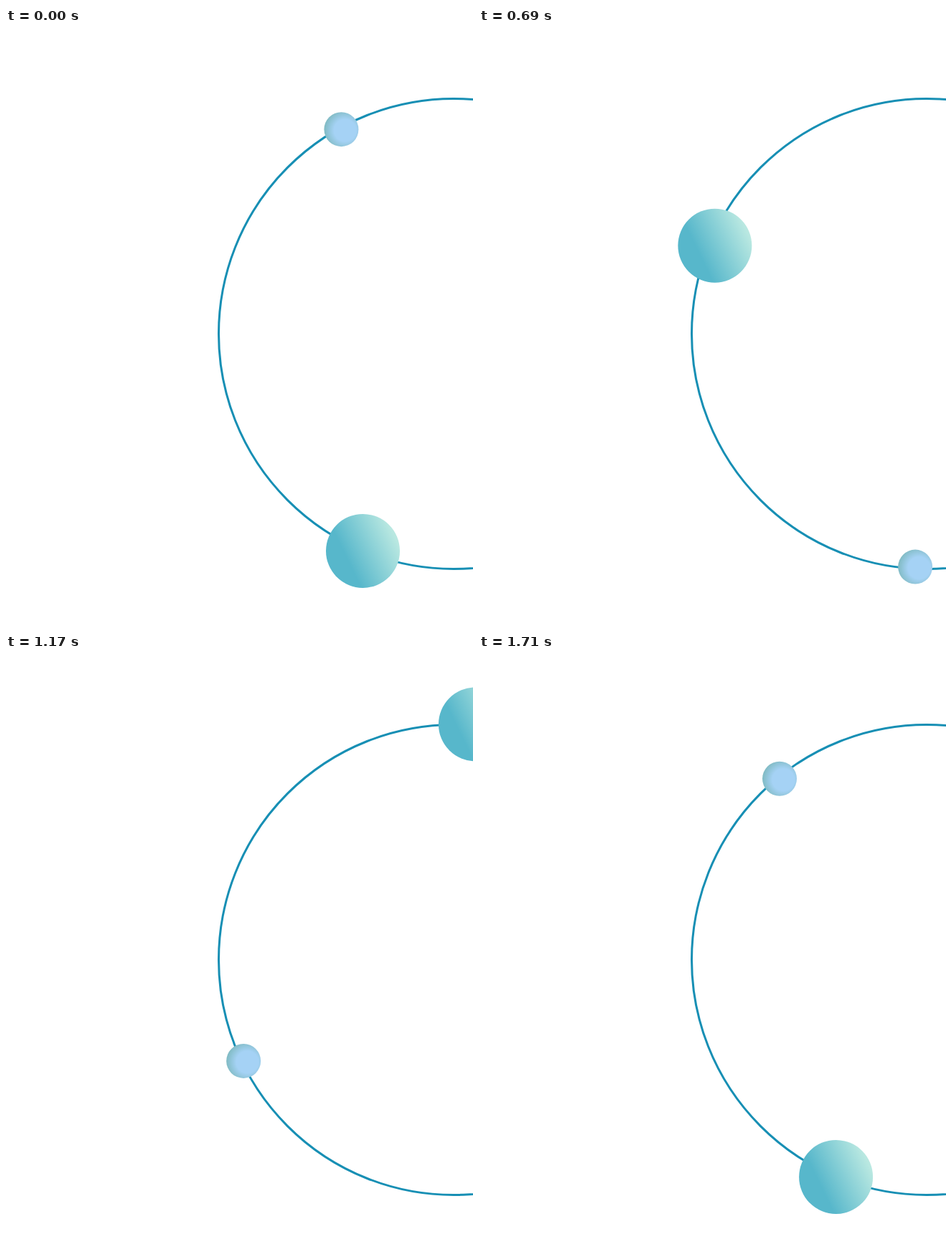
An HTML page that plays this animation: 651 px wide and 833 px high, repeating every 1.74 s.

```html
<!DOCTYPE html>
<html lang="en">
<head>
<meta charset="utf-8">
<title>Orbiting balls</title>
<style>
  html, body { margin: 0; height: 100%; overflow: hidden; background: #fff; }
  svg { display: block; }
</style>
</head>
<body>
<svg width="651" height="833" viewBox="0 0 651 833">
  <defs>
    <linearGradient id="teal" x1=".27" y1=".57" x2=".91" y2=".26">
      <stop offset="0" stop-color="#57b7cb"/>
      <stop offset="1" stop-color="#b9e8e1"/>
    </linearGradient>
    <radialGradient id="sky" cx=".61" cy=".53" r=".64">
      <stop offset=".5" stop-color="#a5d2f5"/>
      <stop offset="1" stop-color="#7cb8be"/>
    </radialGradient>
  </defs>
  <circle cx="624" cy="426" r="327.5" fill="none" stroke="#178fb4" stroke-width="3"/>
  <circle id="small" r="24" fill="url(#sky)"/>
  <circle id="big" r="51.5" fill="url(#teal)"/>
</svg>
<script>
const LOOP = 1740, STEP = 30, CX = 624, CY = 426;
const rad = degrees => degrees * Math.PI / 180;

// Keys: time in ms, clockwise degrees from the bottom of the ring
const balls = {
  big: {
    keys: [[0, 22.7], [450, 75.3], [690, 112.6], [930, 151.7],
           [1080, 164], [1170, 185.3], [1320, 344.7], [1740, 385.6]],
    // Cuts slightly inside the ring on either side of the leftmost point
    radius: a => 329.5 - 21 * Math.abs(Math.sin(2 * (a - rad(6)))) * Math.sin(a) ** 2
  },
  small: {
    keys: [[0, 151.2], [330, 195], [570, 348], [690, 362.8], [930, 391.4],
           [1170, 424.3], [1410, 468.3], [1710, 500.9], [1740, 500.9]],
    radius: () => 325
  }
};

const speed = ([t0, a0], [t1, a1]) => (a1 - a0) / (t1 - t0);

// The slower neighbouring speed keeps the motion smooth without overshoot
function slope(keys, i) {
  const before = i > 0 ? speed(keys[i - 1], keys[i]) : Infinity;
  const after = i < keys.length - 1 ? speed(keys[i], keys[i + 1]) : Infinity;
  return Math.min(before, after);
}

function angleAt(keys, time) {
  const i = keys.findIndex(([t]) => t > time) - 1;
  const [t0, a0] = keys[i], [t1, a1] = keys[i + 1];
  const span = t1 - t0, u = (time - t0) / span, v = 1 - u;
  return v * v * (1 + 2 * u) * a0 + u * u * (1 + 2 * v) * a1
    + span * u * v * (v * slope(keys, i) - u * slope(keys, i + 1));
}

function draw() {
  const time = Math.floor(performance.now() % LOOP / STEP) * STEP;
  for (const [id, { keys, radius }] of Object.entries(balls)) {
    const angle = rad(angleAt(keys, time)), r = radius(angle);
    const x = CX - r * Math.sin(angle), y = CY + r * Math.cos(angle);
    document.getElementById(id).setAttribute("transform", `translate(${x} ${y})`);
  }
  requestAnimationFrame(draw);
}
draw();
</script>
</body>
</html>
```
